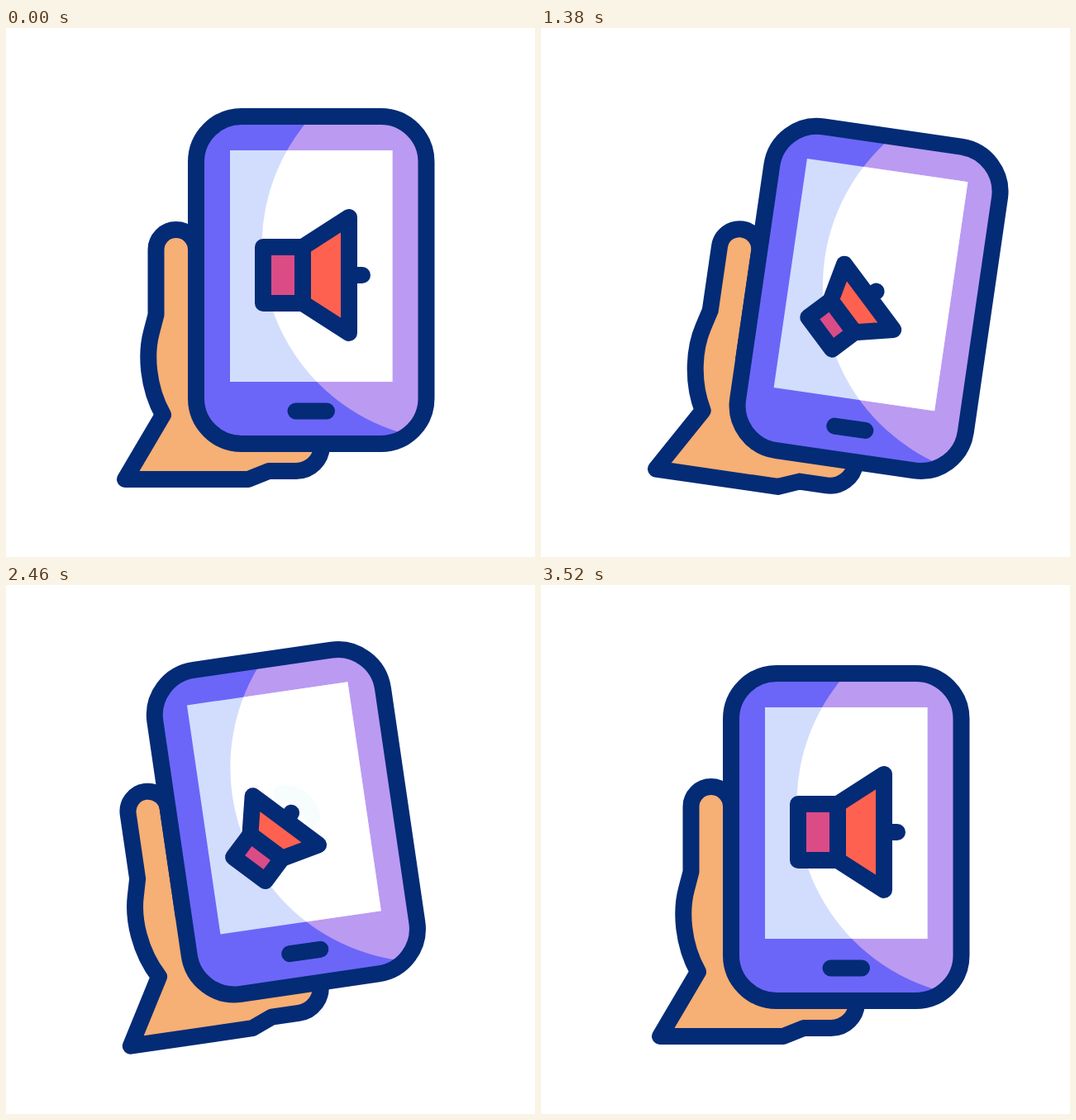
These frames come from a looping animation (640 px wide and 640 px high, 3620 ms). An HTML page:

```html
<!DOCTYPE html>
<html lang="en">
<head>
<meta charset="utf-8">
<title>Phone with speaker</title>
<style>
  html, body { margin: 0; width: 100%; height: 100%; overflow: hidden; background: #fff; }
  svg { display: block; width: 100vw; height: 100vh; }
  .line { stroke: #042b76; stroke-width: 20; stroke-linecap: round; stroke-linejoin: round; }
  .wave { fill: none; stroke: #33cccc; stroke-width: 20; stroke-linecap: round; }
</style>
</head>
<body>
<svg viewBox="0 0 640 640" xmlns="http://www.w3.org/2000/svg">
  <defs>
    <clipPath id="bodyClip"><rect x="230" y="107" width="278.5" height="396" rx="55"/></clipPath>
    <clipPath id="screenClip"><rect x="271" y="148" width="196.5" height="280"/></clipPath>
  </defs>
  <g id="scene">
    <path class="line" fill="#f6af74" d="M230 400V268A24.25 24 0 0 0 181.5 268V347L176 368C169 394 171 434 190 468L144 546H293L318 536H351A31 31 0 0 0 382 505V440Z"/>
    <rect x="230" y="107" width="278.5" height="396" rx="55" fill="#6b66f8"/>
    <circle cx="545" cy="264" r="235.5" fill="#bb9af2" clip-path="url(#bodyClip)"/>
    <rect x="271" y="148" width="196.5" height="280" fill="#d2ddfd"/>
    <circle cx="545" cy="264" r="235.5" fill="#fff" clip-path="url(#screenClip)"/>
    <rect class="line" x="230" y="107" width="278.5" height="396" rx="55" fill="none"/>
    <path class="line" d="M350.5 463.5H388"/>
    <g transform="translate(377 295) rotate(-45)">
      <path class="wave" id="inner" d="M0 -23.7A36 36 0 0 1 0 23.7"/>
      <path class="wave" id="outer" d="M0 -45A68.6 68.6 0 0 1 0 45"/>
    </g>
    <!-- drawn around its own centre -->
    <g id="speaker" class="line">
      <path d="M44 0H60"/>
      <path fill="#ff6150" d="M-12 -34L44 -70V70L-12 34Z"/>
      <rect fill="#db4c86" x="-60" y="-34" width="48" height="68"/>
    </g>
  </g>
</svg>
<script>
const LOOP = 3620;
const PULSES = [533, 1467, 2400];
const $ = id => document.getElementById(id);
const scene = $('scene'), speaker = $('speaker'), inner = $('inner'), outer = $('outer');

// eased progress from 0 to 1 between two times
function ease(t, from, to) {
  const u = Math.min(1, Math.max(0, (t - from) / (to - from)));
  return u * u * (3 - 2 * u);
}

function wave(el, t, delay, base) {
  const start = PULSES.filter(p => p <= t).pop() ?? Infinity;
  const age = t - start;
  const p = ease(age, delay, delay + 500);
  el.setAttribute('transform', `translate(${base + 14 * p} 0)`);
  el.setAttribute('opacity', p * (1 - ease(age, 610, 833)));
}

function draw(t) {
  const tilt = 10 * ease(t, 200, 1200) - 20 * ease(t, 1200, 2200) + 10 * ease(t, 2200, 3200);
  scene.setAttribute('transform', `rotate(${tilt} 228 505)`);

  const turn = ease(t, 200, 533) - ease(t, 3200, 3520);
  const scale = 1 - 0.293 * turn;
  speaker.setAttribute('transform',
    `translate(${371 - 24 * turn} ${299 + 26 * turn}) rotate(${-45 * turn}) scale(${scale})`);
  // keep the outline equally thick while the speaker shrinks
  speaker.style.strokeWidth = 20 / scale;

  wave(inner, t, 0, 11);
  wave(outer, t, 110, 35);
}

const begin = performance.now();
function tick() {
  draw((performance.now() - begin) % LOOP);
  requestAnimationFrame(tick);
}
tick();
</script>
</body>
</html>
```
